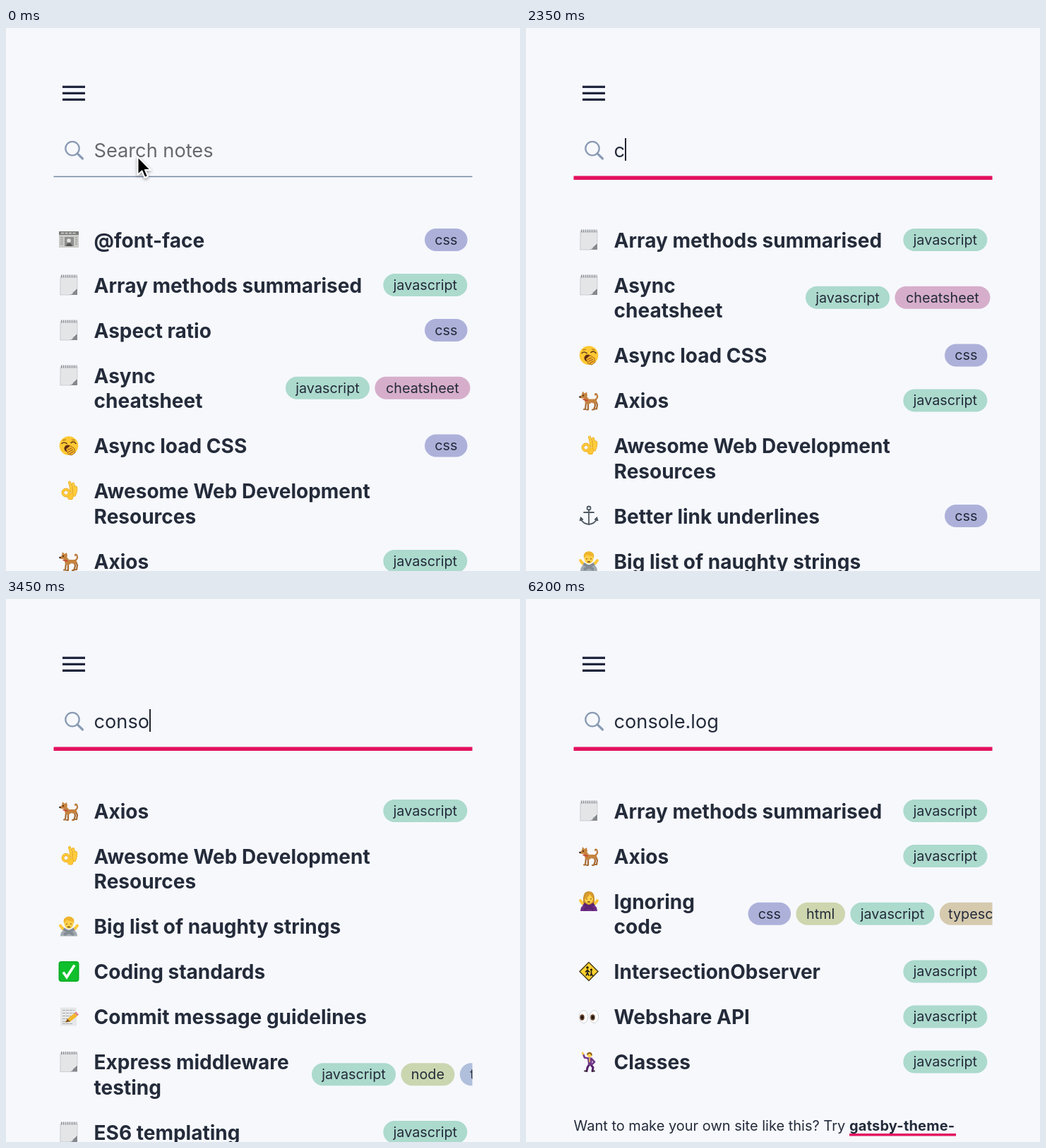
Write an HTML page that moves like this. It is 728 by 769 pixels and loops after 6.3 s.

```html
<!DOCTYPE html>
<html lang="en">
<head>
<meta charset="utf-8">
<title>Search notes</title>
<style>
  html, body { margin: 0; width: 100%; height: 100%; overflow: hidden; background: #f6f8fc; }
  svg { display: block; width: 100vw; height: 100vh; }
  text { font-family: Inter, "Open Sans", sans-serif; font-optical-sizing: none; fill: #242b3a; }
  .title { font-size: 28px; font-weight: 700; }
  .tag { font-size: 19.8px; text-anchor: middle; }
  .field { font-size: 27.2px; }
  .foot { font-size: 20px; }
  .link { font-size: 20px; font-weight: 700; letter-spacing: .2px; }
</style>
</head>
<body>
<svg viewBox="0 0 728 769">
  <defs>
    <clipPath id="column"><rect x="60" y="230" width="600.5" height="539"/></clipPath>

    <g id="news">
      <path d="M-14-12H14V11H-14Z" fill="#cbcbc9"/>
      <path d="M-14-12H14V-7H-14Z" fill="#7d7d7b"/>
      <path d="M-11-9.5H11" stroke="#d8d8d6" stroke-width="1.6" stroke-dasharray="4 1.5"/>
      <path d="M-6-4H7V9H-6Z" fill="#8f908e"/>
      <path d="M-4 9C-3 3 4 3 5 9Z" fill="#555"/><circle cy="1" r="2.8" fill="#e3e3e1"/>
      <path d="M-12-3H-8M-12 0H-8M-12 3H-8M-12 6H-8M9-3H12M9 0H12M9 3H12M9 6H12" stroke="#8b8b89" stroke-width="1.2"/>
    </g>

    <g id="pad">
      <path d="M-12-12H12V4L3 14H-12.5Z" fill="#e3e5e7"/>
      <path d="M12 4V14H1C5 13 7 10 6.5 7C8 8 11 7 12 4Z" fill="#85898e"/>
      <path d="M3 14C6 12 7 10 6 6C9 7.5 11 6 12 4Z" fill="#f1f2f3"/>
      <path d="M-12.5 14H3M12 4V-12M-12 14V-12" fill="none" stroke="#c3c7cb" stroke-width=".8"/>
      <path d="M-11-12.5H11.5" stroke="#777b80" stroke-width="4" stroke-dasharray="1.2 1.5"/>
    </g>

    <g id="yawn">
      <circle r="13.3" fill="#ffc934"/>
      <path d="M-10-3Q-7-6-3-3M3-4Q7-7 10-3" fill="none" stroke="#67401b" stroke-width="1.6" stroke-linecap="round"/>
      <path d="M-9-7.5L-4-8.5M4-8.5L9-7.5" stroke="#a66c16" stroke-width="1.2"/>
      <ellipse cx="-1.5" cy="4" rx="5" ry="5" fill="#5b2c16"/>
      <path d="M-4 5L2 0L8 4L9 10L4 13.5L-1 12Z" fill="#f9b62b" stroke="#a2661a" stroke-width=".9"/>
      <path d="M-2 6L4 3.500M-1 9L6 5.500M1 11.500L7 8" stroke="#8a541a" stroke-width="1"/>
    </g>

    <g id="ok" fill="none" stroke-linecap="round" stroke-linejoin="round">
      <path d="M-2 8Q4 0 8 3L5 12H0Z" fill="#ffc934" stroke="#f2b32a"/>
      <g id="fingers">
        <path d="M1-12Q3-7 3.500 0M6-10Q8-5 7 3M10-5Q11 0 8 6" stroke="#e4a01d" stroke-width="4"/>
        <path d="M1-12Q3-7 3.500 0M6-10Q8-5 7 3M10-5Q11 0 8 6" stroke="#ffce3d" stroke-width="2.800"/>
      </g>
      <circle cx="-4" cy="2.500" r="4.500" stroke="#e3a01e" stroke-width="3.800"/>
      <circle cx="-4" cy="2.500" r="4.500" stroke="#ffcb37" stroke-width="2.700"/>
    </g>

    <g id="dog" fill="none" stroke-linecap="round" stroke-linejoin="round">
      <path d="M9-1Q14-4 11-9Q9-10 9-8" stroke="#bd7c3d" stroke-width="2.200"/>
      <path d="M-4 3L-5 12.500H-7M-1 4L-1 13H-3M8 2L9 7L7 13H5M10 1L12 6L11 12H9" stroke="#a66a32" stroke-width="2.200"/>
      <path d="M-7-3L-3-6L0-2H8Q12-2 11 3Q7 5 4 3Q-2 7-5 4Z" fill="#c58340"/>
      <path d="M-13-5L-10-8L-9-13L-6-10L-3-12L-2-7L-5-3L-11-3Z" fill="#c58340"/>
      <path d="M-8-1.500L-2 0" stroke="#c83d32" stroke-width="1.500"/>
      <circle cx="-8" cy="-7" r="1" fill="#35200f"/><circle cx="-12.500" cy="-5" r="1.300" fill="#35200f"/>
    </g>

    <g id="anchor" fill="none" stroke="#505963" stroke-width="1.800">
      <circle cy="-11" r="2.500"/>
      <path d="M0-8.500V12M-7-5H7M-11 5Q-8 11 0 12Q8 11 11 5" stroke-linecap="round"/>
      <path d="M-13 7L-11.500 1.500L-8 5ZM13 7L11.500 1.500L8 5Z" fill="#505963" stroke-width="1"/>
    </g>

    <g id="no">
      <path d="M-12 14Q-12 6-5 5H5Q12 6 12 14Z" fill="#a3abb2"/>
      <ellipse cy="-4" rx="6.500" ry="7.500" fill="#ffd04a"/>
      <path d="M-7-4Q-9-13 0-14Q9-13 7-4L5-7Q0-7-3-9Z" fill="#efb52c"/>
      <path d="M-3-4V-2.500M3-4V-2.500M-2 1H2" stroke="#724711" stroke-width="1.300"/>
      <path d="M-9 3L7 12M9 3L-7 12" stroke="#838c94" stroke-width="4"/>
      <path d="M-12-1L-9 3M12-1L9 3" stroke="#ffc93c" stroke-width="4" stroke-linecap="round"/>
    </g>

    <g id="refuse">
      <path d="M-8 7V-5Q-7-14 0-14Q7-14 8-5V7Z" fill="#c98f2b"/>
      <ellipse cy="-3.500" rx="6" ry="7" fill="#ffd04a"/>
      <path d="M-6-3Q0-6 1-10Q4-6 6-4Q7-13 0-13Q-7-12-6-3Z" fill="#d89c2d"/>
      <path d="M-3-4V-2.500M3-4V-2.500M-2 1H2" stroke="#724711" stroke-width="1.300"/>
      <path d="M-12 14Q-12 6-5 5H5Q12 6 12 14Z" fill="#6f2c86"/>
      <path d="M-9 3L7 12M9 3L-7 12" stroke="#5c2471" stroke-width="4.200"/>
      <path d="M-12-1L-9 3M12-1L9 3" stroke="#ffc93c" stroke-width="4" stroke-linecap="round"/>
    </g>

    <g id="check">
      <rect x="-14.500" y="-14.500" width="29" height="29" rx="4" fill="#0fbf2c"/>
      <rect x="-13.500" y="-13.500" width="27" height="27" rx="3" fill="none" stroke="#0aa324"/>
      <path d="M-8 1L-3 8L8-9" fill="none" stroke="#fff" stroke-width="3.600"/>
    </g>

    <g id="memo">
      <path d="M-12-13H11V13H-12Z" fill="#e6e7e8"/>
      <path d="M-9-9H8M-9-5H9M-9-1H5M-9 3H3M-9 7H0M-9 10H5" stroke="#a6aaae" stroke-width="1.100" stroke-dasharray="4 1"/>
      <path d="M-5 8L-2 3L8-5L12-1L2 7Z" fill="#f3b72c"/>
      <path d="M8-5L10-7L14-3L12-1Z" fill="#e58182"/><path d="M-5 8L-2 3L2 7Z" fill="#84562b"/>
    </g>

    <g id="crossing">
      <path d="M0-13L13 0L0 13L-13 0Z" fill="#ffd22e" stroke="#4c411f" stroke-width="1.600" stroke-linejoin="round"/>
      <circle cx="-2" cy="-5.500" r="1.700"/><circle cx="3.500" cy="-2.500" r="1.500"/>
      <path d="M-2-3V2L-4 6M-2 2L0 6M-5 1L-2-2L1 1M3.500-1V3L2 6.500M3.500 3L5.500 6.500" fill="none" stroke="#242018" stroke-width="1.700"/>
    </g>

    <g id="eyes">
      <ellipse cx="-7.500" rx="6.200" ry="9" fill="#fff" stroke="#cfd1d4"/>
      <ellipse cx="7.500" rx="6.200" ry="9" fill="#fff" stroke="#cfd1d4"/>
      <ellipse cx="-9.500" cy="1" rx="3.200" ry="4.200" fill="#63402a"/><ellipse cx="5.500" cy="1" rx="3.200" ry="4.200" fill="#63402a"/>
      <circle cx="-9.500" cy="1" r="2" fill="#1d1410"/><circle cx="5.500" cy="1" r="2" fill="#1d1410"/>
    </g>

    <g id="dancer" fill="none" stroke-linecap="round" stroke-linejoin="round">
      <path d="M1 3L-2 8L-3 13M2 3L6 8L5 13" stroke="#552169" stroke-width="3"/>
      <path d="M-1-5H4L3 4H0Z" fill="#71378a" stroke="#71378a" stroke-width="2"/>
      <path d="M-1-5L-6-6L-8-11M4-4L8 0L5 3" stroke="#71378a" stroke-width="2.600"/>
      <path d="M-8-11L-9-13" stroke="#ffcd45" stroke-width="2.400"/>
      <circle cx="1" cy="-10" r="3.400" fill="#ffcd45"/><path d="M-2-11Q2-15 4-10" stroke="#86551f" stroke-width="2"/>
      <path d="M1-5V0" stroke="#e9c654" stroke-width="1.600"/>
      <path d="M-3 13H-6M5 13H8" stroke="#342637" stroke-width="1.800"/>
    </g>
  </defs>

  <rect width="728" height="769" fill="#f6f8fc"/>
  <path d="M80 83.400H112M80 92.400H112M80 101.400H112" stroke="#20263c" stroke-width="3.400"/>
  <g fill="none" stroke="#8a9bb3" stroke-width="2.300">
    <circle cx="94" cy="170.600" r="9.700"/>
    <path d="M101 177.600L108.500 185" stroke-width="3.200" stroke-linecap="round"/>
  </g>
  <text id="hint" class="field" x="124.500" y="182.500" style="fill:#68696d">Search notes</text>
  <text id="value" class="field" x="124.500" y="182.500"></text>
  <rect id="caret" y="156" width="2" height="32" fill="#20242e"/>
  <rect id="rest" x="67.500" y="209.700" width="593" height="1.500" fill="#7688a3"/>
  <rect id="focus" x="67.500" y="209.500" width="593" height="5.500" fill="#e3125f"/>
  <g id="lists"></g>
  <circle id="press" cx="186.300" cy="184.500" r="17" fill="#000" fill-opacity=".44"/>
  <g id="arrow" transform="translate(186 182)" style="filter:drop-shadow(0 2px 2px rgba(0,0,0,.35))">
    <path d="M.5 0V26L6.500 20.500L10.500 30L15 28L11 19H19Z" fill="#000" stroke="#fff" stroke-width="2" stroke-linejoin="round"/>
  </g>
</svg>
<script>
const LOOP = 6300, PRESS = 1250, BLINK = 500;
const $ = id => document.getElementById(id);

// tag: [pill width, colour]
const TAGS = {
  css: [60.5, '#adb1da'], javascript: [119, '#acdacd'], cheatsheet: [135, '#d6aecb'],
  node: [76, '#cad6b0'], testing: [92, '#b0bfdc'], html: [69.5, '#cdd6ae'], typescript: [119, '#d6caae']
};

// note: [icon, title lines, tags, left edge of the first tag]
const js = ['javascript'], css = ['css'], JS_X = 534.3, CSS_X = 593;
const NOTES = {
  font: ['news', '@font-face', css, CSS_X],
  array: ['pad', 'Array methods summarised', js, JS_X],
  aspect: ['pad', 'Aspect ratio', css, CSS_X],
  async: ['pad', 'Async|cheatsheet', ['javascript', 'cheatsheet'], 396],
  load: ['yawn', 'Async load CSS', css, CSS_X],
  awesome: ['ok', 'Awesome Web Development|Resources'],
  axios: ['dog', 'Axios', js, JS_X],
  links: ['anchor', 'Better link underlines', css, CSS_X],
  strings: ['no', 'Big list of naughty strings'],
  coding: ['check', 'Coding standards'],
  commit: ['memo', 'Commit message guidelines'],
  express: ['pad', 'Express middleware|testing', ['javascript', 'node', 'testing'], 433],
  es6: ['pad', 'ES6 templating', js, JS_X],
  ignore: ['refuse', 'Ignoring|code', ['css', 'html', 'javascript', 'typescript'], 314.6],
  observer: ['crossing', 'IntersectionObserver', js, JS_X],
  share: ['eyes', 'Webshare API', js, JS_X],
  classes: ['dancer', 'Classes', js, JS_X]
};

const LISTS = {
  all: 'font array aspect async load awesome axios',
  first: 'array async load axios awesome links strings',
  cons: 'axios awesome strings coding commit express es6',
  full: 'array axios ignore observer share classes',
  dot: 'array axios share ignore observer classes'
};

// [time, typed text, visible list]
const STEPS = [
  [0, '', 'all'], [2250, 'c', 'first'], [2450, 'co', 'first'], [2550, 'con', 'first'],
  [2700, 'cons', 'cons'], [3150, 'conso', 'cons'], [3500, 'consol', 'cons'],
  [3850, 'console', 'full'], [5000, 'console.', 'dot'], [5250, 'console.l', 'dot'],
  [5450, 'console.lo', 'full'], [5650, 'console.log', 'full']
];

const LINE = 35.5, ROW = 64;
const FOOTER = `<text class="foot" x="67.500" y="753">Want to make your own site like this? Try</text>
  <text class="link" x="458" y="753">gatsby-theme-</text>
  <rect x="458" y="757" width="151" height="3.500" fill="#e3125f"/>`;

function pills(names, x, y) {
  return names.map(name => {
    const [w, color] = TAGS[name];
    const out = `<rect x="${x}" y="${y - 16}" width="${w}" height="32" rx="16" fill="${color}"/>
      <text class="tag" x="${x + w / 2}" y="${y + 6.8}">${name}</text>`;
    x += w + 7.4;
    return out;
  }).join('');
}

function drawList(keys) {
  let y = 300;
  return keys.split(' ').map(key => {
    const [icon, title, tags = [], x] = NOTES[key];
    const lines = title.split('|'), extra = (lines.length - 1) * LINE;
    const out = `<use href="#${icon}" x="89" y="${y}"/>` +
      lines.map((s, i) => `<text class="title" x="124.600" y="${y + 10.7 + i * LINE}">${s}</text>`).join('') +
      pills(tags, x, y + extra / 2);
    y += ROW + extra;
    return out;
  }).join('');
}

$('lists').innerHTML = Object.entries(LISTS).map(([name, keys]) =>
  `<g id="list-${name}"><g clip-path="url(#column)">${drawList(keys)}</g>${
    name === 'full' || name === 'dot' ? FOOTER : ''}</g>`).join('');

const show = (id, on) => { $(id).style.display = on ? '' : 'none'; };

function render(t) {
  const [since, typed, list] = STEPS.filter(step => step[0] <= t).pop();
  const focused = t >= PRESS;
  const idle = t - Math.max(since, PRESS);

  if ($('value').textContent !== typed) $('value').textContent = typed;
  const width = typed ? $('value').getComputedTextLength() : 0;
  $('caret').setAttribute('x', Math.round(124.5 + width));

  show('hint', !typed);
  show('caret', focused && Math.floor(idle / BLINK) % 2 === 0);
  show('rest', !focused);
  show('focus', focused);
  show('arrow', !focused);
  show('press', focused && !typed);
  for (const name in LISTS) show('list-' + name, name === list);
}

const start = performance.now();
function frame() {
  render((performance.now() - start) % LOOP);
  requestAnimationFrame(frame);
}
frame();
</script>
</body>
</html>
```
